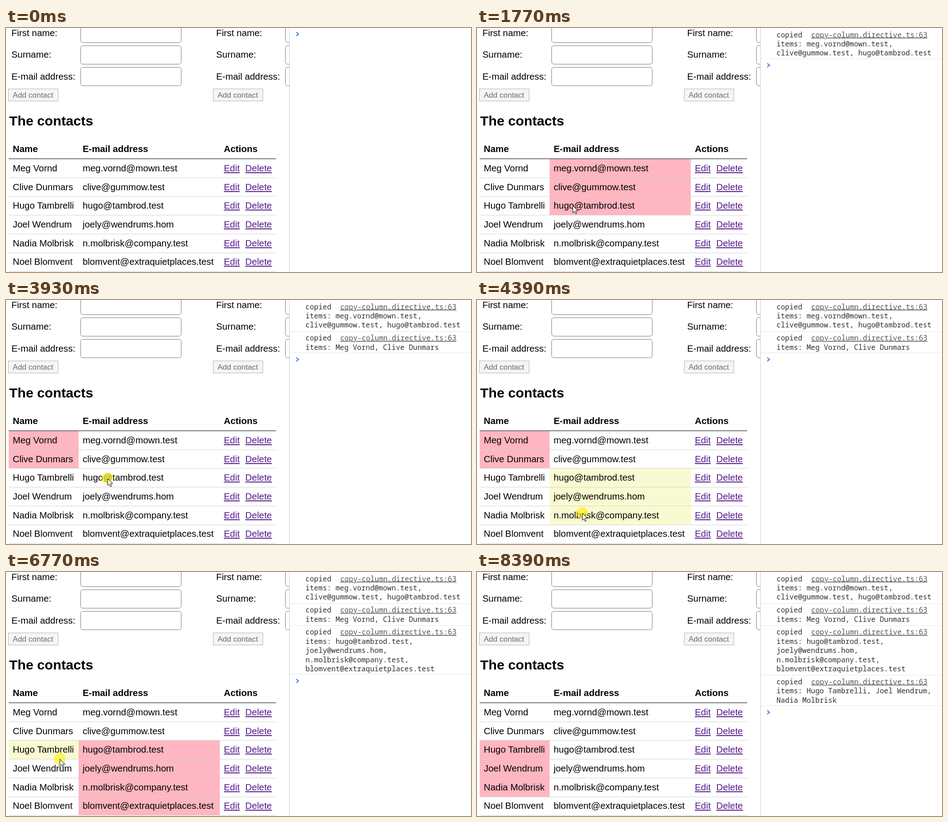
Write an HTML page that moves like this. It is 1031x543 px and loops after 8.94 s.

```html
<!DOCTYPE html>
<html lang="en">
<head>
<meta charset="utf-8">
<title>Copy column</title>
<style>
  html, body { margin: 0; width: 100%; height: 100%; overflow: hidden; background: #fff; }
  svg { display: block; width: 1031px; height: 543px; }
  text { font: 20.4px "Liberation Sans", Arial, sans-serif; fill: #000; white-space: pre; }
  .bold { font-weight: 700; }
  .title { font-size: 30.2px; font-weight: 700; }
  .btn { font-size: 17px; fill: #6d6d6d; }
  .link { fill: #551a8b; text-decoration: underline; }
  .mono { font: 15.92px "Noto Sans Mono", "DejaVu Sans Mono", monospace; fill: #303030; }
  .file { fill: #545454; text-decoration: underline; }
  .field { fill: #fff; stroke: #767676; }
  .button { fill: #f5f5f5; stroke: #b2b2b2; }
  .line { shape-rendering: crispEdges; }
</style>
</head>
<body>
<svg viewBox="0 0 1031 543">
  <defs><clipPath id="pane"><rect width="628" height="543"/></clipPath></defs>
  <g id="cells"></g>
  <g id="page" clip-path="url(#pane)"></g>
  <rect class="line" x="628" y="0" width="1" height="543" fill="#cbcbcb"/>
  <g id="console"></g>
  <path id="prompt" d="M643.5 -4.2L648.7 0L643.5 4.2" fill="none" stroke="#3780d8" stroke-width="2"/>
  <g id="mouse">
    <circle id="press" r="13" fill="#fff000" opacity=".6"/>
    <path d="M.5 .5V16.2L4.2 12.7L6.8 18.5L9.2 17.5L6.7 11.7H11.7Z" fill="#fff" stroke="#000"/>
  </g>
</svg>
<script>
const LOOP = 8940, TOP = 291.5, ROW = 41.7;
const $ = id => document.getElementById(id);

const people = [
  ['Meg Vornd', 'meg.vornd@mown.test'],
  ['Clive Dunmars', 'clive@gummow.test'],
  ['Hugo Tambrelli', 'hugo@tambrod.test'],
  ['Joel Wendrum', 'joely@wendrums.hom'],
  ['Nadia Molbrisk', 'n.molbrisk@company.test'],
  ['Noel Blomvent', 'blomvent@extraquietplaces.test']
];
const columns = [{ x: 6, w: 155 }, { x: 161, w: 313 }];

// Column, first row, last row, press, highlight and release times, console line breaks after item
const drags = [
  { col: 1, from: 0, to: 2, down: 1070, lit: 1070, up: 1700, breaks: [0] },
  { col: 0, from: 0, to: 1, down: 2770, lit: 2770, up: 3160, breaks: [] },
  { col: 1, from: 2, to: 5, down: 3930, lit: 4000, up: 4930, breaks: [0, 1, 2] },
  { col: 0, from: 2, to: 4, down: 6700, lit: 6700, up: 7470, breaks: [1] }
];

// Start, end, steps, target x and y, optional control point
const moves = [
  [70, 920, 12, 205, 316, -10, 350],
  [1070, 1530, 7, 212, 395],
  [1930, 2620, 10, 84, 314],
  [2770, 3080, 5, 88, 353],
  [3310, 3620, 5, 225, 394],
  [3930, 4700, 11, 237, 509],
  [5240, 5620, 6, 569, 440],
  [5700, 6080, 6, 200, 356],
  [6160, 6620, 7, 118, 394, 165, 340],
  [6700, 7000, 5, 120, 457],
  [7080, 7240, 3, 123, 478],
  [7850, 8390, 8, 895, 546, 420, 380]
];

const text = (x, y, s, cls = '') => `<text x="${x}" y="${y}" class="${cls}">${s}</text>`;
const rect = (x, y, w, h, attrs) => `<rect x="${x}" y="${y}" width="${w}" height="${h}" ${attrs}/>`;
const rule = (x, y, w, h, color) => rect(x, y, w, h, `class="line" fill="${color}"`);

function form(x) {
  const labels = ['First name:', 'Surname:', 'E-mail address:'];
  return labels.map((label, i) =>
    text(x + 12, Math.round(18 + i * 48.4), label) +
    rect(x + 165.5, -8.5 + i * 48, 223, 41, 'rx="5" class="field"')
  ).join('') + rect(x + 5.5, 135.5, 110, 27, 'class="button"') + text(x + 15, 155, 'Add contact', 'btn');
}

function table() {
  const head = text(15, 276, 'Name', 'bold') + text(170, 276, 'E-mail address', 'bold') +
    text(483, 276, 'Actions', 'bold') + rule(6, 290, 593, 2, '#777');
  return head + people.map(([name, mail], i) => {
    const y = Math.round(TOP + i * ROW + 27.4);
    return text(15, y, name) + text(170, y, mail) + text(483, y, 'Edit', 'link') +
      text(530.5, y, 'Delete', 'link') + rule(6, Math.round(TOP + (i + 1) * ROW - .5), 593, 1, '#d3d3d3');
  }).join('');
}

function entryLines({ col, from, to, breaks }) {
  const lines = ['items:'];
  people.slice(from, to + 1).forEach((person, i, all) => {
    const item = person[col] + (i < all.length - 1 ? ',' : '');
    if (breaks.includes(i - 1)) lines.push(item);
    else lines[lines.length - 1] += ' ' + item;
  });
  return lines;
}

function showConsole(count) {
  let y = 0, html = '';
  drags.slice(0, count).forEach((drag, i) => {
    const lines = entryLines(drag);
    html += text(664, y + 20.5, 'copied', 'mono') + text(741, y + 20.5, 'copy-column.directive.ts:63', 'mono file');
    lines.forEach((line, n) => html += text(664, y + 40.9 + n * 20.4, line, 'mono'));
    y += (lines.length + 1) * 20.4 + 8.4;
    html += rule(629, Math.round(i === count - 1 ? y - 2 : y), 402, 1, '#e6e6e6');
  });
  $('console').innerHTML = html;
  $('prompt').setAttribute('transform', `translate(0 ${y + 13.4})`);
}

function pointer(t) {
  let x = 865, y = 522;
  for (const [start, end, steps, tx, ty, cx = (x + tx) / 2, cy = (y + ty) / 2] of moves) {
    if (t < start) break;
    const k = Math.floor((t - start) / (end - start) * (steps - 1) + .1);
    const p = Math.min(1, (k + 1) / steps);
    const e = p * p * (3 - 2 * p);
    const mix = (a, c, b) => a * (1 - e) ** 2 + 2 * c * e * (1 - e) + b * e * e;
    x = mix(x, cx, tx);
    y = mix(y, cy, ty);
  }
  return { x, y };
}

function fillCells({ col, from }, to, color) {
  const { x, w } = columns[col];
  return rule(x, Math.round(TOP + from * ROW), w, Math.round((to - from + 1) * ROW), color);
}

let shown = -1;
function draw(now) {
  const t = now % LOOP;
  const done = drags.filter(d => t >= d.up).length;
  const active = drags.find(d => t >= d.down && t < d.up);
  const { x, y } = pointer(t);

  let cells = done ? fillCells(drags[done - 1], drags[done - 1].to, '#ffb6c1') : '';
  if (active && t >= active.lit) {
    const row = Math.floor((y - TOP) / ROW);
    cells += fillCells(active, Math.max(active.from, Math.min(active.to, row)), '#fafad2');
  }
  $('cells').innerHTML = cells;

  if (done !== shown) showConsole(shown = done);
  $('mouse').setAttribute('transform', `translate(${Math.round(x)} ${Math.round(y)})`);
  $('mouse').style.display = t >= 70 && t < 8390 ? '' : 'none';
  $('press').style.display = active ? '' : 'none';
}

$('page').innerHTML = form(0) + form(454) + text(7, 217, 'The contacts', 'title') + table();

const began = performance.now();
function tick() {
  draw(performance.now() - began);
  requestAnimationFrame(tick);
}
tick();
</script>
</body>
</html>
```
